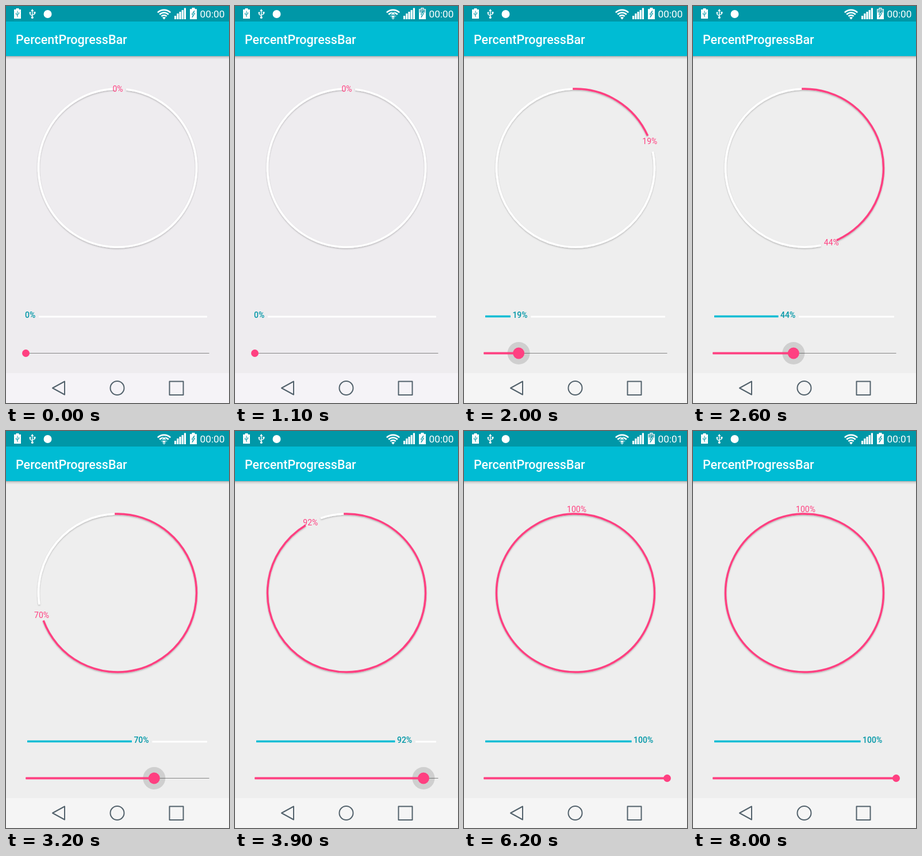
An HTML page for the animation above (8.2 s loop, 388 px wide and 690 px high).

```html
<!DOCTYPE html>
<html lang="en">
<head>
<meta charset="utf-8">
<title>PercentProgressBar</title>
<style>
  html, body { margin: 0; width: 100%; height: 100%; overflow: hidden; background: #eee; }
  svg { display: block; width: 388px; height: 690px; font-family: Roboto, "Noto Sans", sans-serif; }
  .line { fill: none; stroke-width: 3.5; }
  .nav { fill: none; stroke: #53626c; stroke-width: 2; stroke-linejoin: round; }
</style>
</head>
<body>
<svg viewBox="0 0 388 690">
  <defs>
    <linearGradient id="shade" x2="0" y2="1">
      <stop stop-color="#000" stop-opacity=".28"/>
      <stop offset=".4" stop-color="#000" stop-opacity=".1"/>
      <stop offset="1" stop-color="#000" stop-opacity="0"/>
    </linearGradient>
    <filter id="drop" x="-10%" y="-10%" width="120%" height="120%">
      <feDropShadow dx="0" dy="1.5" stdDeviation="1" flood-opacity=".24"/>
    </filter>
  </defs>

  <rect id="page" width="388" height="690" fill="#eee"/>
  <rect y="87" width="388" height="6" fill="url(#shade)"/>
  <rect y="27" width="388" height="60" fill="#00bcd4"/>
  <rect width="388" height="27" fill="#0097a7"/>
  <text x="17" y="66" font-size="21.5" font-weight="500" fill="#fff">PercentProgressBar</text>

  <g fill="#fff">
    <path d="M17.5 4h5v2H26v16H14V6h3.5z"/>
    <g fill="none" stroke="#0097a7">
      <path d="M20 8.5v10.5M17.5 12v2.5l2.5 1.5M22.500 11v2.500l-2.500 1.500"/>
    </g>
    <path d="M45.800 5l2.600 4h-5.200z"/>
    <circle cx="45.800" cy="20" r="2.100"/>
    <circle cx="42" cy="11.800" r="1.500"/>
    <rect x="48.400" y="10" width="3" height="3"/>
    <path d="M45.800 8v11M42 12v2.500l3.800 2.500M49.900 12v1.800l-4.100 2.200" fill="none" stroke="#fff" stroke-width="1.400"/>
    <circle cx="72.500" cy="14" r="7"/>
    <g id="wifi" fill="none" stroke="#fff" stroke-width="2.700"></g>
    <path d="M275 23.500l-3-3.600q3-2 6 0z"/>
    <path id="traffic" d="M275 10l4.600 5h-9.200zM275 21.500l4.600-5h-9.200z" stroke="#0097a7"/>
    <g id="signal"></g>
    <path d="M323.500 3h5v2.200h3.500V23h-12V5.200h3.500z"/>
    <path id="empty" d="M324.500 4h3v2.200h3.500v5.300h-10V6.200h3.500z" fill="#6fb9c3"/>
    <path d="M327.800 8l-4.600 6.300h2.600l-1.800 5.500 4.800-6.900h-2.600z" fill="none" stroke="#0097a7"/>
    <text id="clock" x="337.500" y="20" font-size="17.300">00:00</text>
  </g>

  <g filter="url(#drop)">
    <path id="ringRest" class="line" stroke="#fff"/>
    <path id="ringDone" class="line" stroke="#ff4081"/>
  </g>
  <text id="ringText" font-size="14" fill="#ff4081" text-anchor="middle"></text>

  <path id="barRest" class="line" stroke="#fff" style="stroke-width:3"/>
  <path id="barDone" class="line" stroke="#00bcd4"/>
  <text id="barText" y="542" font-size="14" font-weight="500" fill="#0097a7"></text>

  <path d="M34.500 603.500H353.500" stroke="#858585"/>
  <path id="slideDone" class="line" stroke="#ff4081"/>
  <circle id="ripple" cy="603.500"/>
  <path id="slideOver" class="line" stroke="#ff4081"/>
  <circle id="thumb" cy="603.500" fill="#ff4081"/>

  <rect id="navBar" y="638" width="388" height="52" fill="#f5f5f5"/>
  <path class="nav" d="M81 664L102 652.500V675.500Z"/>
  <circle class="nav" cx="193.500" cy="664" r="12"/>
  <rect class="nav" x="284.500" y="652.500" width="24" height="23.500"/>
</svg>
<script>
const LOOP = 8200, STEP = 100;
const CX = 194, CY = 281.5, R = 137.5;
const START = -2;

// [time, value] tables, linear between points
const PERCENT = [[1500, 0], [2000, 19.3], [3200, 70.3], [4000, 96], [4200, 100]];
const THUMB = [[1400, 6.5], [1600, 10], [4300, 10], [4500, 6.5]];
const RIPPLE = [[1400, 0], [1600, 19.5]];
const SHADE = [[1400, 0], [1600, .13], [4400, .13], [4600, .06], [4900, 0]];
const TRAFFIC = [[700, 1500], [2700, 3700], [5800, 6700]];
const CLOCK_TICK = 5500;

const $ = id => document.getElementById(id);
const set = (id, attrs) => {
  for (const k in attrs) $(id).setAttribute(k, attrs[k]);
};

function at(table, t) {
  if (t <= table[0][0]) return table[0][1];
  for (let i = 1; i < table.length; i++) {
    const [t0, v0] = table[i - 1], [t1, v1] = table[i];
    if (t <= t1) return v0 + (v1 - v0) * (t - t0) / (t1 - t0);
  }
  return table[table.length - 1][1];
}

// Angles are in degrees, clockwise from the top
function polar(deg, r = R, x = CX, y = CY) {
  const a = deg * Math.PI / 180;
  return [x + r * Math.sin(a), y - r * Math.cos(a)];
}

function arc(from, to, r = R, x = CX, y = CY) {
  if (to <= from) return '';
  const end = Math.min(to, from + 359.99);
  return `M${polar(from, r, x, y)}A${r} ${r} 0 ${+(end - from > 180)} 1 ${polar(end, r, x, y)}`;
}

const hline = (x0, x1, y) => x1 > x0 ? `M${x0} ${y}H${x1}` : '';

$('wifi').innerHTML = [6.5, 11, 15.7].map(r => `<path d="${arc(-45, 45, r, 275, 22.5)}"/>`).join('');
$('signal').innerHTML = [6, 10, 13, 16, 19.5].map((h, i) =>
  `<rect x="${293 + i * 4.2}" y="${23 - h}" width="3.2" height="${h}"/>`).join('');

function drawRing(p, label, width) {
  const full = p === 100, angle = p * 3.6;
  const done = full ? 358 : angle - 2.4;
  set('ringDone', { d: arc(START, done) });
  set('ringRest', { d: full ? '' : arc(done + (width + 3) / 2.4, 360 + START) });
  const [x, y] = full ? [196, 136] : polar(angle + (p > 9 ? 1.7 : 0));
  set('ringText', { x: x + (p < 10 ? .5 : 0), y: y + 5 });
  $('ringText').textContent = label;
}

function drawBar(p, label, width) {
  const x = 33.5 + p / 100 * (296.6 - width);
  set('barDone', { d: hline(37, x - 4, 539.5) });
  set('barRest', { d: p < 100 ? hline(x + width + 5.5, 350, 540) : '' });
  set('barText', { x: x - .5 });
  $('barText').textContent = label;
}

function drawSlider(p, t) {
  const x = 34.5 + 3.19 * p, d = hline(34.5, x, 603.5);
  set('slideDone', { d });
  set('slideOver', { d });
  set('thumb', { cx: x, r: at(THUMB, t) });
  set('ripple', { cx: x, r: at(RIPPLE, t), 'fill-opacity': at(SHADE, t) });
}

function draw(now) {
  const t = Math.floor(now % LOOP / STEP) * STEP;
  const p = Math.floor(at(PERCENT, t)), label = p + '%';
  const width = p < 10 ? 18 : p < 100 ? 26 : 34.5;
  drawRing(p, label, width);
  drawBar(p, label, width);
  drawSlider(p, t);

  const early = t < 1400;
  set('page', { fill: early ? '#eeecef' : '#eee' });
  set('navBar', { fill: early ? '#f5f3f7' : '#f5f5f5' });
  const busy = TRAFFIC.some(([a, b]) => t >= a && t < b);
  set('traffic', { visibility: busy ? 'visible' : 'hidden' });
  set('empty', { visibility: t % 1600 >= 800 ? 'visible' : 'hidden' });
  $('clock').textContent = t < CLOCK_TICK ? '00:00' : '00:01';
}

const begin = performance.now();
function loop() {
  draw(performance.now() - begin);
  requestAnimationFrame(loop);
}
loop();
</script>
</body>
</html>
```
